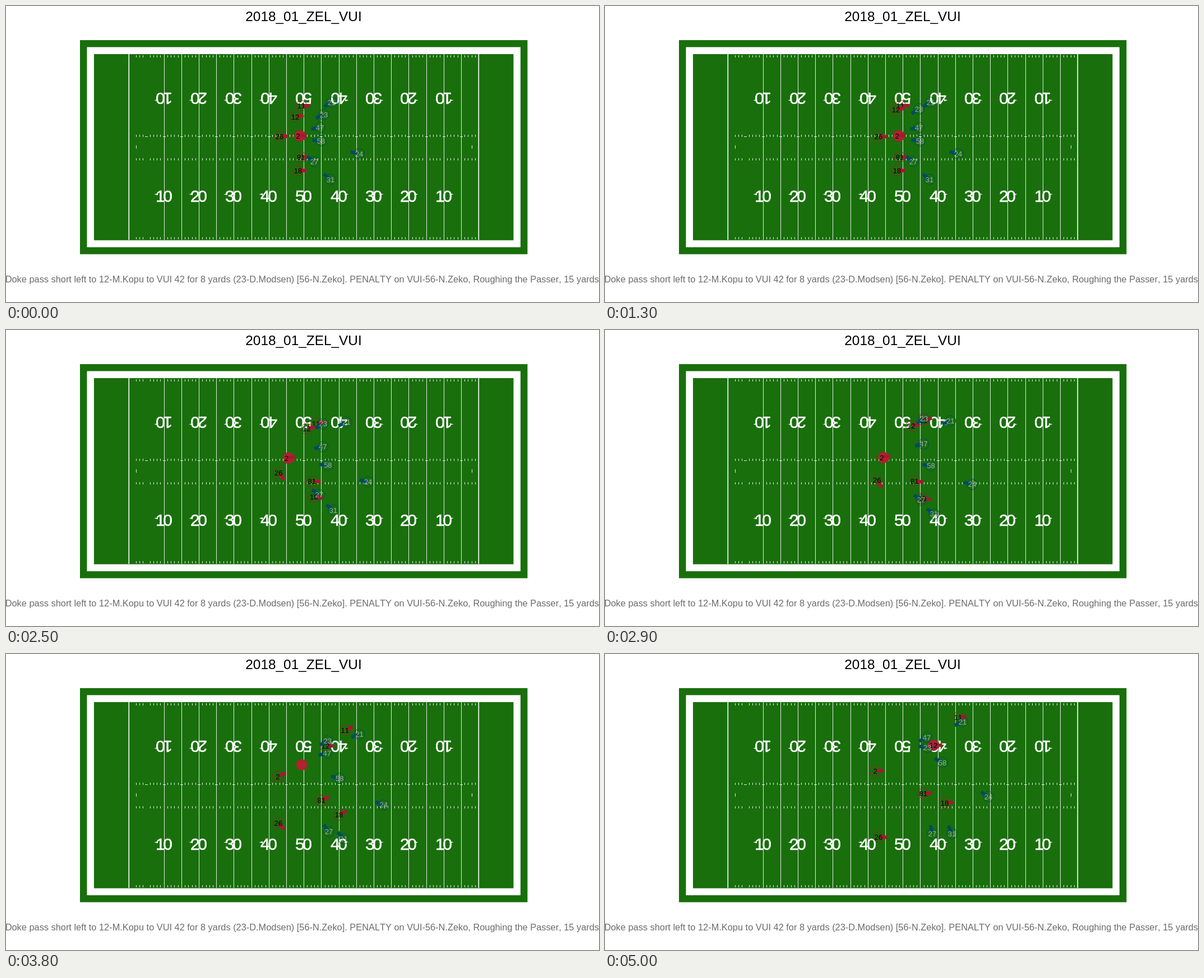
Animation of 1058 by 529 pixels, one loop 5.1 s. Source, as an HTML page with a canvas:

```html
<!DOCTYPE html>
<html lang="en">
<head>
<meta charset="utf-8">
<title>Play tracker</title>
<style>
html, body { margin: 0; width: 100%; height: 100%; overflow: hidden; background: #fff; }
canvas { display: block; width: 1058px; height: 529px; }
</style>
</head>
<body>
<canvas id="stage" width="1058" height="529"></canvas>
<script>
const W = 1058, H = 529, LOOP = 5100, STEP = 100;
const SNAP = 1300, SET = 3300, THROW = 3500, CATCH = 4200, END = 5000;
const GREEN = '#196f0c', RED = '#a71930', TEAL = '#004c5f', CHALK = 'rgba(255,255,255,0.88)';
const FONT = '"Liberation Sans", Arial, sans-serif';
const YARD = 6.238, CX = 531.2, CY = 252.3;
const ctx = document.getElementById('stage').getContext('2d');

const yardX = yd => Math.round(CX + (yd - 50) * YARD);
const lerp = (a, b, u) => a + (b - a) * u;
const mix = (p, q, u) => [lerp(p[0], q[0], u), lerp(p[1], q[1], u)];
const progress = (from, to, t) => Math.min(1, Math.max(0, (t - from) / (to - from)));

function label(c, text, x, y, size, color, align = 'center') {
  c.font = `${size}px ${FONT}`;
  c.fontKerning = 'none';
  c.textAlign = align;
  c.fillStyle = color;
  c.fillText(text, x, y);
}

function box(c, color, x, y, w, h) {
  c.fillStyle = color;
  c.fillRect(x, y, w, h);
}

// The playing area grown by some yards on every side
function turf(c, color, margin) {
  const w = (120 + 2 * margin) * YARD, h = (160 / 3 + 2 * margin) * YARD;
  box(c, color, CX - w / 2, CY - h / 2, w, h);
}

function yardNumber(c, yd, flip) {
  const shown = String(yd > 50 ? 100 - yd : yd);
  const side = Math.sign(yd - 50) * (flip ? -1 : 1);
  c.save();
  c.translate(yardX(yd), flip ? 166 : 339);
  if (flip) c.rotate(Math.PI);
  c.strokeStyle = '#fff';
  c.lineWidth = 0.5;
  [...shown].forEach((digit, i) => {
    const x = i ? 6.7 : -6.7;
    label(c, digit, x, 10.7, 30, '#fff');
    c.strokeText(digit, x, 10.7);
  });
  if (side) {
    c.beginPath();
    c.moveTo(side * 17.5, -2.5);
    c.lineTo(side * 11, -4.3);
    c.lineTo(side * 11, -0.7);
    c.fill();
  }
  c.restore();
}

function drawField() {
  const layer = document.createElement('canvas');
  layer.width = W;
  layer.height = H;
  const c = layer.getContext('2d');
  box(c, '#fff', 0, 0, W, H);
  turf(c, GREEN, 4);
  turf(c, '#fff', 2);
  turf(c, GREEN, 0);

  for (let yd = 10; yd <= 95; yd += 5) box(c, CHALK, yardX(yd), 86, 1, 332);
  for (const yd of [0, 100]) box(c, '#fff', yardX(yd) - 0.5, 86, 1.6, 332);

  for (let yd = 2; yd < 100; yd++) {
    const x = yardX(yd);
    if (yd % 5) {
      for (const y of [88, 230, 272, 413]) box(c, CHALK, x, y, 1, 4);
    } else {
      box(c, CHALK, x - 2, 233, 5, 1);
    }
  }
  for (const yd of [2, 98]) box(c, CHALK, yardX(yd), 249, 1, 6);

  for (let yd = 10; yd <= 90; yd += 10) {
    yardNumber(c, yd, false);
    yardNumber(c, yd, true);
  }

  label(c, '2018_01_ZEL_VUI', 531, 27, 24.4, '#000');
  label(c, 'Doke pass short left to 12-M.Kopu to VUI 42 for 8 yards (23-D.Modsen) ' +
    '[56-N.Zeko]. PENALTY on VUI-56-N.Zeko, Roughing the Passer, 15 yards',
    1058, 494, 16.38, '#6b6b6b', 'right');
  return layer;
}

// Each route runs from the snap through the set point to the finish
const route = (num, snap, set, end, { pace = 1.6, shift = [0, 0] } = {}) =>
  ({ num, snap, set, end, pace, lineup: [snap[0] + shift[0], snap[1] + shift[1]] });

const passer = route(2, [521, 232], [487, 227], [482, 209], { pace: 1 });
const receiver = route(12, [519, 185], [558, 166], [586, 163], { shift: [-3, 13] });
const offense = [
  route(11, [527, 178], [586, 154], [630, 113]),
  receiver,
  route(26, [488, 233], [484, 284], [488, 327]),
  passer,
  route(81, [526, 270], [559, 271], [568, 249], { pace: 1 }),
  route(18, [521, 294], [585, 304], [606, 266])
];
const defense = [
  route(21, [581, 172], [625, 160], [638, 121], { pace: 1 }),
  route(23, [560, 184], [573, 147], [575, 167], { shift: [7, 10] }),
  route(47, [560, 217], [572, 198], [574, 149]),
  route(58, [562, 241], [590, 243], [602, 194]),
  route(24, [630, 264], [666, 281], [684, 255]),
  route(27, [550, 278], [570, 315], [584, 321]),
  route(31, [579, 310], [590, 337], [619, 321])
];

function position(p, t) {
  if (t < SNAP) return mix(p.lineup, p.snap, progress(0, SNAP, t));
  if (t < SET) return mix(p.snap, p.set, progress(SNAP, SET, t) ** p.pace);
  return mix(p.set, p.end, 1 - (1 - progress(SET, END, t)) ** 1.6);
}

function ballAt(t) {
  const [x, y] = position(passer, Math.min(t, THROW));
  return mix([x + 4, y], position(receiver, Math.max(t, CATCH)), progress(THROW, CATCH, t));
}

// Attackers lean from downfield into their run
function runAngle(p, t) {
  const [x0, y0] = position(p, t - 50), [x1, y1] = position(p, t + 50);
  return Math.atan2(y1 - y0, x1 - x0 + 3);
}

// Defenders watch a spot just behind the ball
function watchAngle(p, t) {
  const [x, y] = position(p, t), [bx, by] = ballAt(t);
  return Math.atan2(by - y, bx - 40 - x);
}

function drawPlayer(p, t, angle, color, ink) {
  const [x, y] = position(p, t), dx = Math.cos(angle), dy = Math.sin(angle);
  ctx.strokeStyle = color;
  ctx.lineWidth = 6;
  ctx.beginPath();
  ctx.moveTo(x + 2 * dx, y + 2 * dy);
  ctx.lineTo(x + 15.5 * dx, y + 15.5 * dy);
  ctx.stroke();
  ctx.lineWidth = 0.9;
  ctx.beginPath();
  ctx.arc(x, y, 9.5, 0, Math.PI * 2);
  ctx.stroke();
  label(ctx, p.num, x, y + 4.6, 13, ink);
}

function draw(t) {
  ctx.drawImage(field, 0, 0);
  ctx.fillStyle = '#b02330';
  ctx.beginPath();
  ctx.arc(...ballAt(t), 10, 0, Math.PI * 2);
  ctx.fill();
  for (const p of offense) drawPlayer(p, t, runAngle(p, t), RED, '#000');
  for (const p of defense) drawPlayer(p, t, watchAngle(p, t), TEAL, '#a5acaf');
}

const field = drawField();
const start = performance.now();
function tick() {
  const t = (performance.now() - start) % LOOP;
  draw(Math.floor(t / STEP) * STEP);
  requestAnimationFrame(tick);
}
tick();
</script>
</body>
</html>
```
